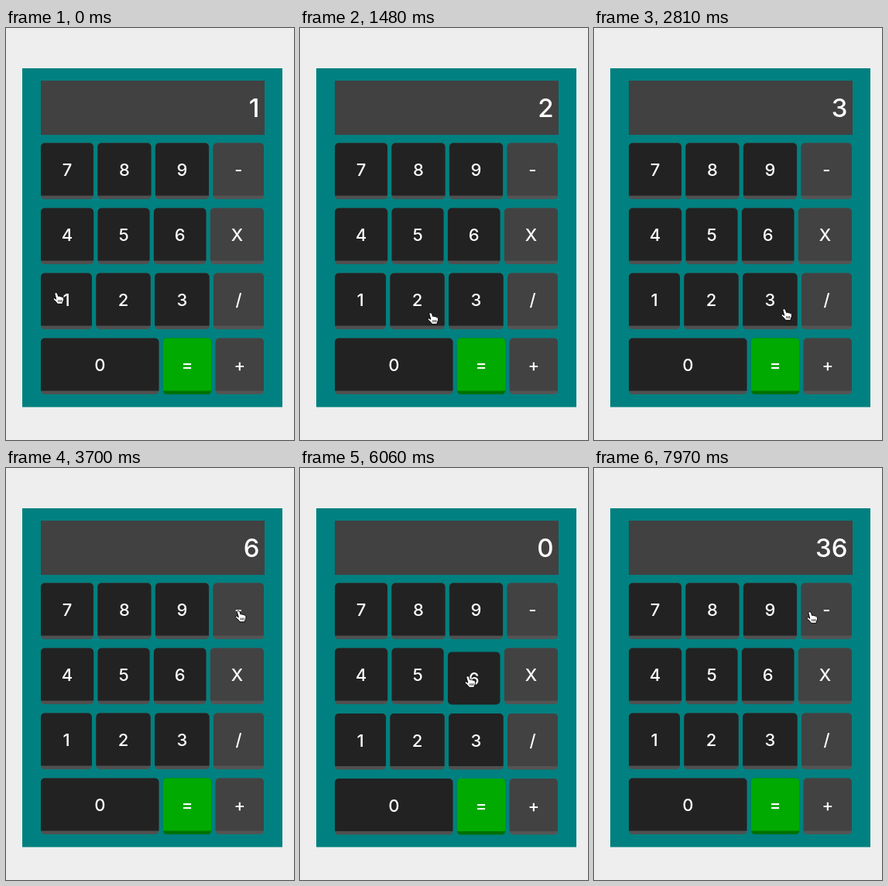
An HTML page with a canvas for the animation above (8000 ms loop, 372 px wide and 532 px high).

```html
<!DOCTYPE html>
<html lang="en">
<head>
<meta charset="utf-8">
<title>Calculator</title>
<style>
html, body { margin: 0; width: 100%; height: 100%; overflow: hidden; background: #eee; }
canvas { display: block; width: 372px; height: 532px; }
</style>
</head>
<body>
<canvas id="stage"></canvas>
<script>
const LOOP = 8000, STEP = 147.7, LAST = 54;
const LEFT = 45, RIGHT = 333, TOP = 148.5, PITCH = 84, GAP = 5.4;
const FACE = 68, EDGE = 4.6, PRESS = 5;
const DARK = ['#222', '#505050'], GREY = ['#424242', '#545454'], GREEN = ['#0a0', '#006f00'];

const canvas = document.getElementById('stage');
const ctx = canvas.getContext('2d');
const dpr = window.devicePixelRatio || 1;
canvas.width = 372 * dpr;
canvas.height = 532 * dpr;

const setFont = size => ctx.font = `500 ${size}px Inter, "Liberation Sans", sans-serif`;
const colorsOf = label => label === '=' ? GREEN : '-X/+'.includes(label) ? GREY : DARK;
const grow = label => label === '0' ? 2.9 : 1;
const sum = list => list.reduce((a, b) => a + b, 0);

// Each row shares its free space among the keys, on top of the label widths
function layout() {
  setFont(22);
  return ['789-', '456X', '123/', '0=+'].flatMap((line, row) => {
    const labels = [...line];
    const widths = labels.map(s => ctx.measureText(s).width);
    const free = RIGHT - LEFT - GAP * (labels.length - 1) - sum(widths);
    const unit = free / sum(labels.map(grow));
    let x = LEFT;
    return labels.map((label, i) => {
      const key = { label, row, x, y: TOP + row * PITCH, w: widths[i] + unit * grow(label) };
      x += key.w + GAP;
      return key;
    });
  });
}

// Pointer key points: step, x, y and, for a click, the value it brings up
const path = [
  [0, 60, 341], [4, 294, 436, '0'], [9, 164, 367, '2'], [13, 294, 434, '0'],
  [18, 241, 362, '3'], [21, 228, 436, '6'], [23, 264, 312], [27, 327, 55],
  [31, 274, 292], [32, 274, 378], [37, 286, 268, '0'], [41, 212, 268, '6'],
  [45, 226, 437], [45.5, 226, 437, '36'], [47, 345, 350], [49, 218, 221],
  [52, 232, 117], [LAST, 274, 185]
];

// The pointer eases between points and rests one step after a click
function pointerAt(n) {
  const i = Math.max(1, path.findIndex(p => p[0] >= n));
  const [n0, x0, y0, clicked] = path[i - 1], [n1, x1, y1] = path[i];
  const start = n0 + (clicked ? 1 : 0);
  const u = Math.max(0, (n - start) / (n1 - start)), e = u * u * (3 - 2 * u);
  return [x0 + (x1 - x0) * e, y0 + (y1 - y0) * e];
}

function valueAt(n) {
  const last = path.filter(p => p[3] && p[0] < n).pop();
  return last ? last[3] : '1';
}

function pressedAt(n, keys) {
  const click = path.find(p => p[3] && p[0] === n);
  if (!click) return null;
  const x = click[1] + 6, y = click[2] + 4;
  return keys.find(k => x > k.x && x < k.x + k.w && y > k.y && y < k.y + FACE + EDGE);
}

function box(x, y, w, h, r, fill) {
  ctx.fillStyle = fill;
  ctx.beginPath();
  ctx.roundRect(x, y, w, h, r);
  ctx.fill();
}

function text(s, x, y, size, align) {
  setFont(size);
  ctx.textAlign = align;
  ctx.fillStyle = '#fff';
  ctx.fillText(s, x, y);
}

function drawKey({ label, row, x, y, w }, pressed) {
  const [face, edge] = colorsOf(label);
  const down = pressed && pressed.label === label;
  if (down) y += PRESS;
  else if (pressed && row > pressed.row) y += 0.5;
  if (!down) box(x, y, w, FACE + EDGE, 5, edge);
  box(x, y, w, FACE, down ? 5 : [5, 5, 1, 1], face);
  text(label, x + w / 2, y + 42.5, 22, 'center');
}

const hand = new Path2D('M4 .8C5.3.3 6.2 1.2 6.6 2.4L7.7 5.6' +
  'C8.6 4.8 9.8 5.1 10.1 6C11 5.3 12.2 5.8 12.4 6.7C13.5 6.3 14.3 7 14.4 8' +
  'C14.7 10.2 14.2 11.5 13.4 13L13 15.3H6.3L5.6 13.8L1.4 9.7' +
  'C.4 8.5 1.6 7.2 3 7.9L4.8 9.2L3 3C2.7 1.9 3.1 1.1 4 .8Z');
const creases = new Path2D('M7.8 10V13M9.8 10V13M11.7 10V13');

function drawHand(x, y) {
  ctx.save();
  ctx.translate(x, y);
  ctx.fillStyle = '#fff';
  ctx.strokeStyle = '#000';
  ctx.lineWidth = 1;
  ctx.fill(hand);
  ctx.stroke(hand);
  ctx.lineWidth = 0.8;
  ctx.stroke(creases);
  ctx.restore();
}

function draw(t) {
  const n = Math.min(LAST, Math.floor((t + 10) / STEP));
  const keys = layout(), pressed = pressedAt(n, keys);

  ctx.setTransform(dpr, 0, 0, dpr, 0, 0);
  box(0, 0, 372, 532, 0, '#eee');
  box(21, 52, 336, 437.5, 0, '#008080');
  box(LEFT, 68, 289, 70, 0, '#414141');
  text(valueAt(n), 327.5, 115, 33, 'right');
  keys.forEach(key => drawKey(key, pressed));
  drawHand(...pointerAt(n));
}

function frame() {
  draw(performance.now() % LOOP);
  requestAnimationFrame(frame);
}
frame();
</script>
</body>
</html>
```
